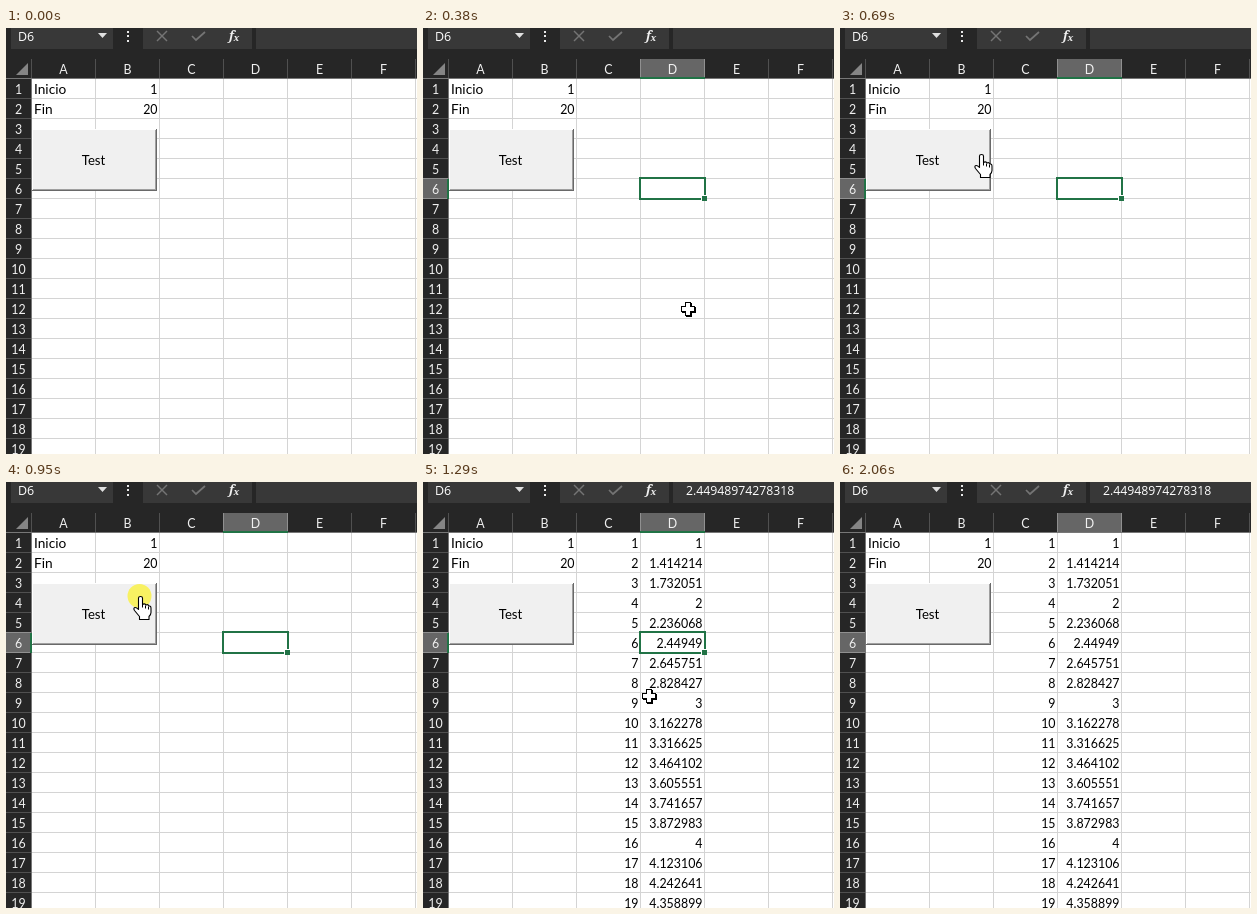
An HTML page with a canvas for the animation above (2110 ms loop, 411 by 426 pixels).

```html
<!DOCTYPE html>
<html lang="es">
<head>
<meta charset="utf-8">
<style>
  html, body { margin: 0; width: 100%; height: 100%; overflow: hidden; background: #262626; }
  canvas { display: block; }
</style>
</head>
<body>
<canvas id="stage" width="411" height="426"></canvas>
<script>
const ctx = document.getElementById('stage').getContext('2d');
const LOOP = 2110;
const GREEN = '#217346', DARK = '#262626', FIELD = '#383838';
const CELL_FONT = 'Lato, "Open Sans", sans-serif';
const BAR_FONT = '"Open Sans", sans-serif';
const SHOWN = 40, PRESS = 990, RELEASE = 1040, RESULTS = 1070, HIDDEN = 2060;

// The pointer moves only at these moments.
const ticks = [40, 90, 150, 210, 270, 330, 380, 410, 460, 510, 560, 610, 650, 690, 740, 800,
  1110, 1160, 1210, 1260, 1300, 1340, 1390, 1440, 1490];
// Pointer path: time, x, y of the hot spot.
const route = [[40, 318, 383], [380, 265, 281], [560, 160, 153], [610, 147, 134], [690, 141, 126],
  [800, 134, 114], [1110, 134, 114], [1160, 148, 128], [1440, 366, 368], [1490, 399, 418]];

// Positions of the grid line left of a column and above a row (rows count from 1).
const columnX = i => 25 + 64 * i;
const rowY = n => 30 + 20 * n;
const baseline = n => rowY(n) + 16;

function rect(x, y, w, h, color) {
  ctx.fillStyle = color;
  ctx.fillRect(x, y, w, h);
}

function text(value, x, y, { color = '#000', align = 'left', size = 12.4, font = CELL_FONT, style = '' } = {}) {
  ctx.font = `${style} ${size}px ${font}`;
  ctx.fillStyle = color;
  ctx.textAlign = align;
  ctx.fillText(value, x, y);
}

function line(points, color, width) {
  ctx.beginPath();
  points.forEach(([x, y]) => ctx.lineTo(x, y));
  ctx.strokeStyle = color;
  ctx.lineWidth = width;
  ctx.stroke();
}

function polygon(points, color) {
  ctx.beginPath();
  points.forEach(([x, y]) => ctx.lineTo(x, y));
  ctx.fillStyle = color;
  ctx.fill();
}

function drawFormulaBar(hasResults) {
  rect(0, 0, 411, 31, DARK);
  rect(5, 0, 102, 21, FIELD);
  rect(137, 0, 109, 21, FIELD);
  rect(250, 0, 161, 21, FIELD);
  text('D6', 12, 13, { color: '#fff', size: 12.5, font: BAR_FONT });
  polygon([[92, 5], [101, 5], [96.5, 10]], '#e0e0e0');
  for (const y of [3, 7, 12]) rect(121, y, 2, 2, '#e8e8e8');
  line([[151, 3], [161, 13]], '#747474', 1.4);
  line([[161, 3], [151, 13]], '#747474', 1.4);
  line([[186, 8], [190, 12], [199, 4]], '#747474', 1.7);
  const italic = { color: '#f0f0f0', font: '"Noto Serif", serif', style: 'italic bold' };
  text('f', 223, 12, { ...italic, size: 12.5 });
  text('x', 227.5, 13, { ...italic, size: 9.5 });
  if (hasResults) text(Math.sqrt(6).toPrecision(15), 263, 13, { color: '#fff', size: 12.25, font: BAR_FONT });
}

function drawGrid(headersActive) {
  rect(0, 31, 411, 20, DARK);
  rect(0, 51, 25, 375, DARK);
  rect(25, 51, 386, 375, '#fff');
  polygon([[22, 35], [22, 47], [10, 47]], '#858585');

  for (let i = 0; i <= 6; i++) {
    rect(columnX(i), 31, 1, 19, '#505050');
    if (i) rect(columnX(i), 51, 1, 375, '#d4d4d4');
  }
  for (let n = 1; n <= 19; n++) {
    rect(0, rowY(n) + 20, 25, 1, '#505050');
    rect(26, rowY(n) + 20, 385, 1, '#d4d4d4');
  }
  if (headersActive) {
    rect(217, 31, 65, 19, '#909090');
    rect(218, 31, 63, 19, '#666');
    rect(0, 150, 25, 21, '#909090');
    rect(0, 151, 25, 19, '#666');
  }
  rect(0, 50, 411, 1, '#777');
  rect(25, 50, 1, 376, '#777');

  const label = { color: '#f0f0f0', align: 'center' };
  [...'ABCDEF'].forEach((letter, i) => text(letter, columnX(i) + 32.5, 46, label));
  for (let n = 1; n <= 19; n++) text(n, 12.5, baseline(n), label);
}

function drawCells(hasResults) {
  const right = { align: 'right' };
  text('Inicio', 28, baseline(1), { size: 13.7 });
  text('Fin', 28, baseline(2), { size: 13.7 });
  text('1', 151.5, baseline(1), right);
  text('20', 151.5, baseline(2), right);
  if (!hasResults) return;
  for (let n = 1; n <= 19; n++) {
    text(n, 215.5, baseline(n), right);
    text(Number(Math.sqrt(n).toFixed(6)), 279.5, baseline(n), right);
  }
}

function drawSelection() {
  rect(217, 49, 65, 2, GREEN);
  rect(24, 151, 2, 20, GREEN);
  ctx.strokeStyle = GREEN;
  ctx.lineWidth = 2;
  ctx.strokeRect(217, 150, 65, 21);
  rect(278, 167, 6, 6, '#fff');
  rect(279, 168, 5, 5, GREEN);
}

function drawButton(pressed) {
  const [light, dark, shade] = pressed ? ['#696969', '#fff', '#e3e3e3'] : ['#fff', '#696969', '#a0a0a0'];
  rect(26, 101, 125, 62, dark);
  rect(26, 101, 124, 61, light);
  rect(27, 102, 123, 60, shade);
  rect(27, 102, 122, 59, '#f0f0f0');
  const shift = pressed ? 1 : 0;
  text('Test', 87.5 + shift, 137 + shift, { align: 'center', size: 13.2 });
}

function drawCross() {
  const plus = (r, w, color) => {
    rect(-r, -w, 2 * r, 2 * w, color);
    rect(-w, -r, 2 * w, 2 * r, color);
  };
  ctx.translate(1, 1);
  plus(7, 3, '#000');
  ctx.translate(-1, -1);
  plus(7, 3, '#000');
  plus(6, 2, '#fff');
}

function drawHand() {
  const hand = new Path2D('M-2 1.5Q-2 0 0 0Q2 0 2 1.5V8Q4 6.5 5.5 8.5Q7.5 7.5 8.5 9.5' +
    'Q10.5 9 10.5 12V16Q10.5 18 8.5 20V23H-1V20L-6 14Q-7.5 11.5-5.5 11Q-4 10.8-2 13Z');
  ctx.translate(0.5, 0.5);
  ctx.fillStyle = '#fff';
  ctx.fill(hand);
  ctx.strokeStyle = '#000';
  ctx.lineWidth = 1.1;
  ctx.lineJoin = 'round';
  ctx.stroke(hand);
  for (const [x, y] of [[2, 8], [5, 9], [8, 10]]) line([[x, y], [x, y + 3]], '#000', 1);
}

function pointerAt(time) {
  const tick = ticks.findLast(t => t <= time);
  const next = Math.max(1, route.findIndex(key => key[0] >= tick));
  const [t0, x0, y0] = route[next - 1], [t1, x1, y1] = route[next];
  const k = (tick - t0) / (t1 - t0);
  return [Math.round(x0 + (x1 - x0) * k), Math.round(y0 + (y1 - y0) * k)];
}

function drawPointer(time) {
  const [x, y] = pointerAt(time);
  const overButton = x >= 26 && x < 151 && y >= 101 && y < 163;
  if (time >= 950 && time < RESULTS) {
    ctx.beginPath();
    ctx.arc(x - 0.5, y, 12, 0, 2 * Math.PI);
    ctx.fillStyle = '#f8f162';
    ctx.fill();
  }
  ctx.save();
  ctx.translate(x, y);
  overButton ? drawHand() : drawCross();
  ctx.restore();
}

function render(time) {
  const hasResults = time >= RESULTS;
  drawFormulaBar(hasResults);
  drawGrid(time >= SHOWN);
  drawCells(hasResults);
  if (time >= SHOWN && time < HIDDEN) drawSelection();
  drawButton(time >= PRESS && time < RELEASE);
  if (time >= SHOWN && time < 1540) drawPointer(time);
}

const start = performance.now();
function frame() {
  render((performance.now() - start) % LOOP);
  requestAnimationFrame(frame);
}
frame();
</script>
</body>
</html>
```
